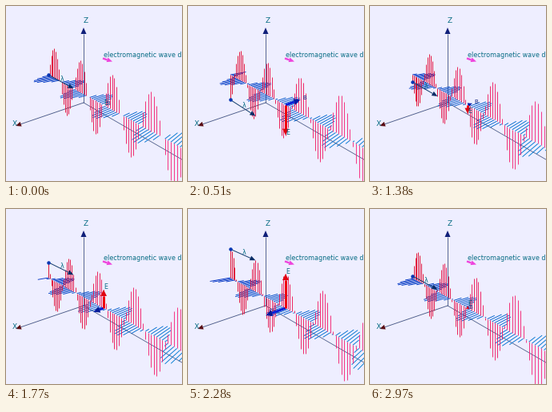
Recreate the animation shown at these times as a matplotlib script. Size 220 by 219 pixels, loop 3000 ms.

```python
import numpy as np
import matplotlib.pyplot as plt
from matplotlib.animation import FuncAnimation
from matplotlib.collections import LineCollection
from matplotlib.patches import Polygon

W, H, DPI = 220, 219, 100
FRAMES, STEP = 100, 30
PX = 72 / DPI
BG = (238 / 255, 238 / 255, 1)

# Perspective of the wave: u in wavelengths, b and e as field strengths
BASE = np.array([122.0, 124.0])
U_DIR = np.array([41.4, 22.8])
B_DIR = np.array([-22.4, 8.3])
E_DIR = np.array([0.0, -43.0])
U_DEPTH, B_DEPTH = 0.1, 0.087
U = np.arange(-2, 3, 1 / 16)

ORIGIN = np.array([97.0, 121.0])
NAVY, SLATE, TEAL, GREY = "#10207a", "#4a5a86", "#0a6e86", "#66667c"


def project(u, b=0, e=0):
    u, b, e = np.broadcast_arrays(*(np.asarray(v, float)[..., None] for v in (u, b, e)))
    return BASE + (u * U_DIR + b * B_DIR + e * E_DIR) / (1 - U_DEPTH * u - B_DEPTH * b)


def shades(far, near):
    k = np.clip((U[:, None] + 2) / 4, 0, 1)
    return (np.array(far) * (1 - k) + np.array(near) * k) / 255


COOL = (shades((222, 0, 36), (248, 40, 130)), shades((0, 50, 195), (0, 125, 210)), TEAL)
WARM = (shades((230, 10, 20), (255, 75, 75)), shades((15, 15, 200), (75, 85, 225)), GREY)

fig = plt.figure(figsize=(W / DPI, H / DPI), dpi=DPI, facecolor=BG)
ax = fig.add_axes([0, 0, 1, 1])
ax.set_xlim(0, W)
ax.set_ylim(H, 0)
ax.axis("off")


def label(x, y, s, color, size=8, **kw):
    return ax.text(x, y, s, color=color, fontsize=size * PX,
                   family="DejaVu Sans", va="center", **kw)


class Arrow:
    def __init__(self, color, head_color, width, length, half, z):
        self.length, self.half = length, half
        self.line, = ax.plot([], [], color=color, lw=width * PX, zorder=z,
                             solid_capstyle="butt")
        self.head = Polygon(np.zeros((3, 2)), fc=head_color, ec="none", zorder=z + 0.1)
        ax.add_patch(self.head)

    def set(self, start, tip):
        d = np.asarray(tip, float) - start
        size = max(np.hypot(*d), 1e-6)
        d = d / size
        n = np.array([-d[1], d[0]])
        k = min(1, 0.35 + size / 20)
        neck = tip - d * self.length * k
        stop = neck if size > self.length else np.asarray(start)
        self.line.set_data(*np.transpose([start, stop]))
        self.head.set_xy([tip, neck + n * self.half * k, neck - n * self.half * k])


# Fixed axes and the direction mark
Arrow(SLATE, NAVY, 0.9, 8, 3.5, 2).set(ORIGIN, np.array([97, 27]))
Arrow(SLATE, "#5a0c14", 0.9, 7, 3, 2).set(ORIGIN, np.array([12, 150]))
vanish = BASE - U_DIR / U_DEPTH
far_end = ORIGIN + (ORIGIN - vanish) * 0.4
ax.plot(*np.transpose([ORIGIN, far_end]), color=SLATE, lw=0.8 * PX, zorder=2)
Arrow("#ee44dd", "#ee44dd", 2.4, 7, 3, 3).set(np.array([121, 65.5]), np.array([133, 69.5]))

texts = [label(96.5, 18.5, "Z", TEAL, 9), label(7.5, 148, "X", TEAL, 9),
         label(122, 62, "electromagnetic wave direction", TEAL, clip_on=True)]

e_lines = LineCollection([], linewidths=0.9 * PX, zorder=5)
b_lines = LineCollection([], linewidths=0.9 * PX, zorder=4)
ax.add_collection(e_lines)
ax.add_collection(b_lines)

e_arrow = Arrow("#f00010", "#e00010", 3, 8, 4, 8)
b_arrow = Arrow("#0020d8", "#0018a8", 3, 8, 4, 7)
span = Arrow("#16406e", "#0a2c66", 1, 7, 3, 6)
dot, = ax.plot([], [], "o", color="#0a38b4", ms=4.5 * PX, mew=0, zorder=6)
e_text = label(0, 0, "E", TEAL, zorder=9)
b_text = label(0, 0, "B", NAVY, 7, zorder=9)
lam_text = label(0, 0, "λ", TEAL, zorder=9, ha="center")


def update(i):
    t = i / FRAMES
    f = np.sin(2 * np.pi * (U - t))
    feet = project(U)
    e_lines.set_segments(np.stack([feet, project(U, e=f)], axis=1))
    b_lines.set_segments(np.stack([feet, project(U, b=f)], axis=1))

    e_col, b_col, ink = WARM if 0.82 <= t < 0.94 else COOL
    e_lines.set_color(e_col)
    b_lines.set_color(b_col)
    for s in (*texts, e_text, lam_text):
        s.set_color(ink)

    v = -np.sin(2 * np.pi * t)
    e_tip, b_tip = project(0, e=v), project(0, b=v)
    e_arrow.set(BASE, e_tip)
    b_arrow.set(BASE, b_tip)
    e_text.set_position(e_tip + (0.5, -3))
    b_text.set_position(b_tip + (3, -2))

    a, b = project(-2, e=v), project(-1, e=v)
    span.set(a, b)
    dot.set_data([a[0]], [a[1]])
    lam_text.set_position((a + b) / 2 + (1, -3))
    return []


anim = FuncAnimation(fig, update, frames=FRAMES, interval=STEP,
                     init_func=lambda: update(0), repeat=True, repeat_delay=0)
plt.show()
```
